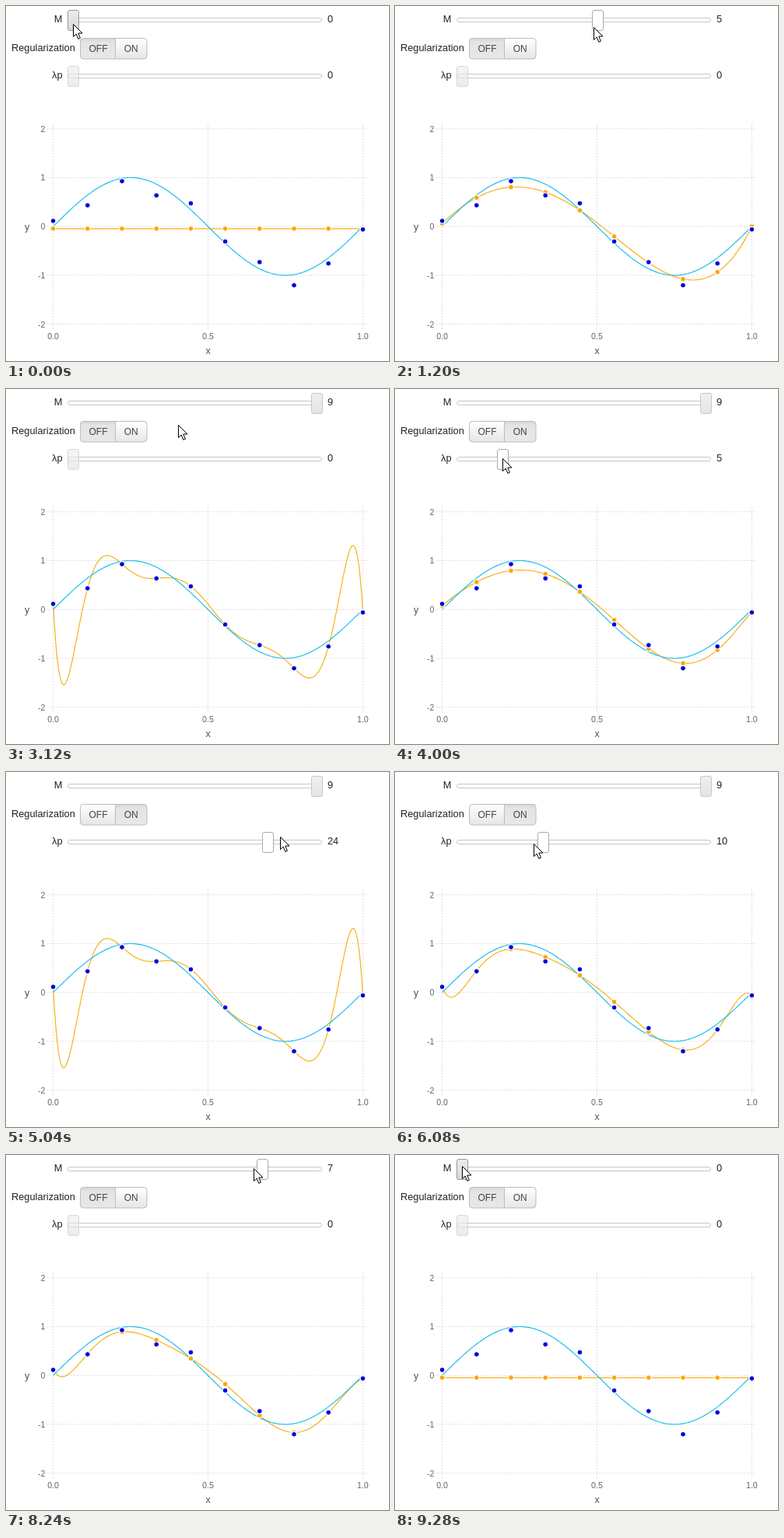
Animation of 492 by 456 pixels, one loop 9.36 s. Source, as an HTML page:

```html
<!DOCTYPE html>
<html lang="en">
<head>
<meta charset="utf-8">
<title>Polynomial fit with regularization</title>
<style>
  html, body { margin: 0; width: 100%; height: 100%; overflow: hidden; background: #fff; }
  svg { display: block; width: 492px; height: 456px; font-family: "Liberation Sans", Arial, sans-serif; }
  .label { font-size: 12.8px; fill: #222; }
  .button { font-size: 12px; fill: #444; text-anchor: middle; }
  .tick { font-size: 10.66px; fill: #6c606b; }
  .axis { font-size: 12.4px; fill: #564a55; text-anchor: middle; }
  .end { text-anchor: end; }
  .mid { text-anchor: middle; }
  .grid { stroke: #d0d0e0; stroke-width: .8; stroke-dasharray: 1.9 1.9; }
  .curve { fill: none; stroke-width: 1.15; stroke-linejoin: round; }
  .dot { stroke: #fff; stroke-width: 1.1; }
</style>
</head>
<body>
<svg id="stage" viewBox="0 0 492 456">
  <defs>
    <linearGradient id="plain" x2="0" y2="1"><stop stop-color="#fff"/><stop offset="1" stop-color="#e6e6e6"/></linearGradient>
    <linearGradient id="pressed" x2="0" y2="1"><stop stop-color="#d6d6d6"/><stop offset=".2" stop-color="#e4e4e4"/><stop offset="1" stop-color="#e8e8e8"/></linearGradient>
    <linearGradient id="rest" x2="0" y2="1"><stop stop-color="#f0f0f0"/><stop offset="1" stop-color="#e4e4e4"/></linearGradient>
    <linearGradient id="hover" x2="0" y2="1"><stop stop-color="#ececec"/><stop offset="1" stop-color="#d8d8d8"/></linearGradient>
  </defs>
</svg>
<script>
const LOOP = 9360, STEP = 80;
const ON_AT = 3360, OFF_AT = 7360;
const SLIDE_X = 86.5, SLIDE_W = 313;

const stage = document.getElementById('stage');

function add(tag, attrs, text) {
  const el = document.createElementNS('http://www.w3.org/2000/svg', tag);
  set(el, attrs);
  if (text !== undefined) el.textContent = text;
  stage.appendChild(el);
  return el;
}
function set(el, attrs) {
  for (const k in attrs) el.setAttribute(k, attrs[k]);
}
const label = (x, y, cls, text) => add('text', { x, y, class: cls }, text);

// Controls
function slider(name, y) {
  label(72.5, y + 3, 'label end', name);
  add('rect', { x: 79.5, y: y - 2.5, width: 326, height: 5, rx: 2.5, fill: '#fff', stroke: '#c6c6c6' });
  return {
    thumb: add('rect', { y: y - 12.5, width: 14, height: 26, rx: 2.5 }),
    value: label(413, y + 3, 'label', '0')
  };
}
const thumbLook = {
  rest: { fill: 'url(#rest)', stroke: '#c8c8c8', opacity: 1 },
  hover: { fill: 'url(#hover)', stroke: '#999', opacity: 1 },
  active: { fill: '#fff', stroke: '#aaa', opacity: 1 },
  off: { fill: 'url(#rest)', stroke: '#c8c8c8', opacity: .7 }
};
function setSlider(s, value, max, look) {
  set(s.thumb, { x: SLIDE_X - 7 + Math.round(SLIDE_W * value / max), ...thumbLook[look] });
  s.value.textContent = value;
}
const degree = slider('M', 18);
const strength = slider('λp', 90);

label(7, 57.5, 'label', 'Regularization');
const offButton = add('path', { d: 'M140.5 41.5H99.5a4 4 0 0 0-4 4V64a4 4 0 0 0 4 4h41z', stroke: '#bbb' });
const onButton = add('path', { d: 'M140.5 41.5H177a4 4 0 0 1 4 4V64a4 4 0 0 1-4 4h-36.5z', stroke: '#bbb' });
label(118.5, 59, 'button', 'OFF');
label(160.7, 59, 'button', 'ON');

// Plot
const px = x => 60.6 + 397.8 * x;
const py = y => 283.2 - 62.75 * y;
for (let v = -2; v <= 2; v++) {
  add('line', { x1: 53, x2: 464, y1: py(v), y2: py(v), class: 'grid' });
  label(50.5, py(v) + 3.8, 'tick end', v);
}
for (const v of [0, .5, 1]) {
  add('line', { x1: px(v), x2: px(v), y1: 151, y2: 415, class: 'grid' });
  label(px(v), 428, 'tick mid', v.toFixed(1));
}
label(259.5, 447, 'axis', 'x');
label(27, 288, 'axis', 'y');

const ys = [.116, .435, .929, .637, .475, -.306, -.731, -1.203, -.757, -.06];
const xs = ys.map((_, i) => i / 9);

function trace(f, end) {
  const n = 240, pts = [];
  for (let i = 0; i <= n; i++) {
    const x = end * i / n;
    pts.push(px(x).toFixed(2) + ' ' + py(f(x)).toFixed(2));
  }
  return 'M' + pts.join('L');
}
const dots = color => xs.map((x, i) =>
  add('circle', { cx: px(x), cy: py(ys[i]), r: 3.3, fill: color, class: 'dot' }));

const fitLine = add('path', { class: 'curve', stroke: '#f8ad10' });
add('path', { class: 'curve', stroke: '#18bdee', d: trace(x => Math.sin(2 * Math.PI * x), .99) });
const fitDots = dots('#ffa500');
dots('#0000dd');

// Ridge least squares by modified Gram-Schmidt on the augmented system
const dot = (a, b) => a.reduce((s, v, i) => s + v * b[i], 0);
function fit(m, lambda) {
  const root = Math.sqrt(lambda), n = m + 1, R = [], c = [];
  const cols = Array.from({ length: n }, (_, j) => [
    ...xs.map(x => x ** j),
    ...Array.from({ length: n }, (_, k) => k === j ? root : 0)
  ]);
  const rhs = [...ys, ...Array(n).fill(0)];
  const remove = (v, q, s) => { for (let i = 0; i < v.length; i++) v[i] -= s * q[i]; };
  for (let j = 0; j < n; j++) {
    const len = Math.sqrt(dot(cols[j], cols[j]));
    const q = cols[j].map(v => v / len);
    R[j] = [];
    R[j][j] = len;
    for (let k = j + 1; k < n; k++) {
      R[j][k] = dot(q, cols[k]);
      remove(cols[k], q, R[j][k]);
    }
    c[j] = dot(q, rhs);
    remove(rhs, q, c[j]);
  }
  const w = Array(n).fill(0);
  for (let j = n - 1; j >= 0; j--) {
    let s = c[j];
    for (let k = j + 1; k < n; k++) s -= R[j][k] * w[k];
    w[j] = s / R[j][j];
  }
  return x => w.reduceRight((s, v) => s * x + v, 0);
}

// Pointer: time, x, y
const path = [
  [0, 86, 23], [80, 88, 23], [2000, 375, 30], [2160, 400, 30], [2880, 404, 24],
  [3200, 160, 53], [3360, 160, 53], [3600, 88, 90], [3760, 88, 90], [3840, 128, 89],
  [3920, 138, 89], [4000, 138, 89], [5040, 352, 83], [5280, 399, 84], [5440, 399, 84],
  [5920, 212, 91], [6000, 191, 92], [6080, 178, 92], [6880, 87, 91], [7040, 87, 91],
  [7280, 114, 52], [7440, 114, 52], [7920, 400, 18], [8000, 400, 18], [8920, 86, 14],
  [LOOP, 86, 14]
];
function pointer(t) {
  t = Math.max(0, t);
  const i = path.findIndex(k => k[0] > t);
  const [t0, x0, y0] = path[i - 1], [t1, x1, y1] = path[i];
  const p = (t - t0) / (t1 - t0);
  return [x0 + (x1 - x0) * p, y0 + (y1 - y0) * p];
}
const arrow = add('path', {
  d: 'M.5 .5V16.5L4.2 13 6.8 19.3 9.4 18.2 6.8 12H12z',
  fill: '#fff', stroke: '#000', 'stroke-linejoin': 'round'
});
const hand = add('path', {
  d: 'M-1.5 14V1.2Q-1.5-.5 0-.5T1.5 1.2V7Q3.5 4.6 4.5 6.6V8.6Q5 5 7.2 7.4V9.4Q9 7 9.5 10V15' +
     'L7.5 18.5V21.5H-2V19L-6.5 12.5Q-6.5 9.2-1.5 13.5M1.5 7V11M4.5 8V11M7.2 9V11.5',
  fill: '#fff', stroke: '#000', 'stroke-linejoin': 'round'
});

// A thumb follows the pointer one step late
function dragged(t, max) {
  const p = (pointer(t - STEP)[0] - SLIDE_X) / SLIDE_W;
  return Math.round(max * Math.min(1, Math.max(0, p)));
}
function controls(t) {
  return {
    m: t < 2880 || t >= 8000 ? dragged(t, 9) : 9,
    p: t >= 3760 && t < 7120 ? dragged(t, 30) : 0,
    on: t >= ON_AT && t < OFF_AT
  };
}
function degreeLook(t) {
  if (t < STEP || t >= 8960) return 'hover';
  if (t < 2960 || t >= 8000) return 'active';
  return t >= 7840 ? 'hover' : 'rest';
}
function strengthLook(t, enabled) {
  if (!enabled) return 'off';
  if (t < 3600 || t >= 7120) return 'rest';
  return t < 3760 ? 'hover' : 'active';
}

let shown = '';
function drawFit({ m, p, on }) {
  const key = [m, p, on].join();
  if (key === shown) return;
  const f = fit(m, on ? 10 ** -p : 0);
  set(fitLine, { d: trace(f, 1) });
  fitDots.forEach((el, i) => set(el, { cy: py(f(xs[i])) }));
  shown = key;
}

function draw(t) {
  // The plot answers one step after the controls
  const now = controls(t), before = controls(t - STEP);
  drawFit(before);
  setSlider(degree, now.m, 9, degreeLook(t));
  setSlider(strength, now.p, 30, strengthLook(t, before.on));
  set(offButton, { fill: now.on ? 'url(#plain)' : 'url(#pressed)' });
  set(onButton, { fill: now.on ? 'url(#pressed)' : 'url(#plain)' });

  const [x, y] = pointer(t);
  const overButton = x > 95 && x < 181 && y > 41 && y < 68;
  const transform = `translate(${Math.round(x)} ${Math.round(y)})`;
  set(arrow, { transform, display: overButton ? 'none' : 'inline' });
  set(hand, { transform, display: overButton ? 'inline' : 'none' });
}

const start = performance.now();
function tick() {
  const t = (performance.now() - start) % LOOP;
  draw(Math.floor(t / STEP) * STEP);
  requestAnimationFrame(tick);
}
tick();
</script>
</body>
</html>
```
